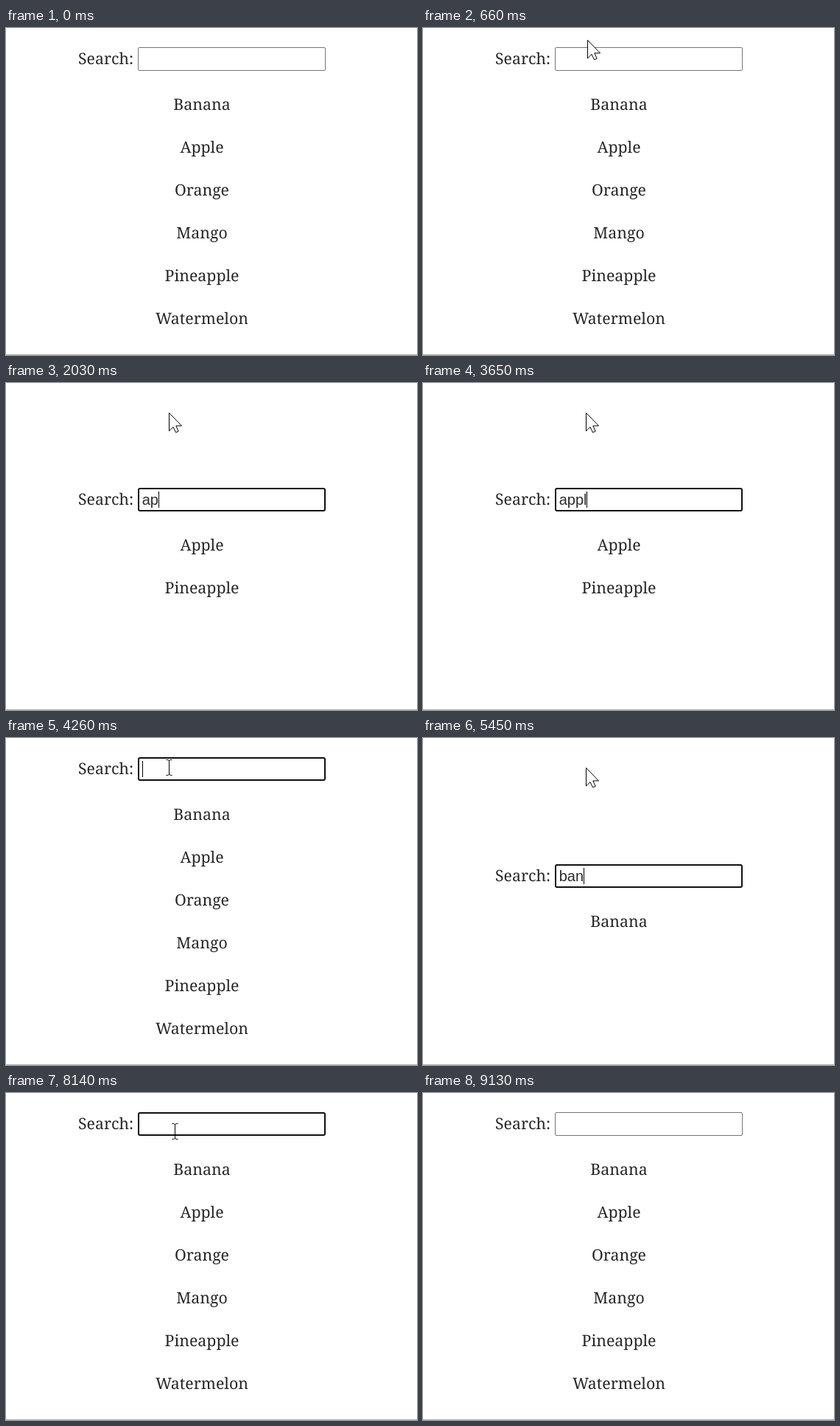
Animation of 558 by 443 pixels, one loop 9330 ms. Source, as an HTML page:

```html
<!DOCTYPE html>
<html lang="en">
<head>
<meta charset="utf-8">
<title>Search filter</title>
<style>
  html, body { margin: 0; width: 100%; height: 100%; overflow: hidden; background: #fff; }
  svg { display: block; width: 100vw; height: 100vh; }
  .serif { font: 21.3px Cambria, "Noto Serif", serif; fill: #262626; text-rendering: geometricPrecision; }
  .typed { font: 20px "Liberation Sans", Arial, sans-serif; fill: #2a2a2a; white-space: pre; }
  .item { text-anchor: middle; }
</style>
</head>
<body>
<svg viewBox="0 0 558 443">
  <rect y="442" width="558" height="1" fill="#b4b4b4"/>
  <g id="form">
    <text class="serif" x="98" y="23">Search:</text>
    <rect id="idle" x="179.5" y=".5" width="254" height="31" rx="1.5" fill="#fff" stroke="#767676"/>
    <rect id="ring" x="180" y="1" width="253" height="30" rx="2" fill="#fff" stroke="#101010" stroke-width="2"/>
    <text id="typed" class="typed" x="184.7" y="23"></text>
    <rect id="caret" y="5" width="1" height="22" fill="#000"/>
    <g id="list"></g>
  </g>
  <circle id="press" cx="221" cy="40" r="18" fill="#ff0" fill-opacity=".47"/>
  <g id="mouse">
    <path id="arrow" d="M.5 .5V25L6 19.6 9.5 27 13.2 25.4 9.8 18H17.5Z" fill="#fff" stroke="#000"/>
    <path id="beam" d="M-3.5-10.5H-1.5L.5-9.5 2.5-10.5H4.5M.5-9.5V9.5M-3.5 10.5H-1.5L.5 9.5 2.5 10.5H4.5" fill="none" stroke="#000"/>
  </g>
</svg>
<script>
const LOOP = 9330, FOCUS = 1020, BLUR = 9130, BLINK = 530;
const fruits = ["Banana", "Apple", "Orange", "Mango", "Pineapple", "Watermelon"];

// [time, value of the field]
const keys = [
  [FOCUS, ""], [1650, "a"], [2030, "ap"], [2180, "app"], [2460, "appl"], [3170, "apple"],
  [3650, "appl"], [3800, "app"], [3950, "ap"], [4110, "a"], [4260, ""],
  [4740, "b"], [5120, "ba"], [5450, "ban"], [5630, "bann"],
  [6440, "ban"], [6720, "ba"], [7000, "b"], [7200, ""], [7230, ""]
];

// [time, x, y] of the pointer tip
const path = [
  [50, 503, 430], [150, 430, 310], [250, 365, 220], [370, 305, 160], [470, 258, 60],
  [560, 236, 0], [660, 223, 16], [710, 223, 16], [850, 221, 40], [8100, 221, 40],
  [8250, 250, 85], [8400, 325, 190], [8550, 412, 310], [8700, 490, 400],
  [8800, 523, 432], [8850, 513, 438], [8900, 513, 443]
];

const $ = id => document.getElementById(id);
const show = (el, on) => el.setAttribute("visibility", on ? "visible" : "hidden");
const move = (el, x, y) => el.setAttribute("transform", `translate(${x} ${y})`);

const rows = fruits.map(name => {
  const el = document.createElementNS("http://www.w3.org/2000/svg", "text");
  el.setAttribute("class", "serif item");
  el.setAttribute("x", 266);
  el.textContent = name;
  $("list").append(el);
  return el;
});

function pointerAt(t) {
  const i = path.findIndex(p => p[0] > t);
  if (i < 1) return null;
  const [t0, x0, y0] = path[i - 1], [t1, x1, y1] = path[i];
  const k = (t - t0) / (t1 - t0);
  return [x0 + (x1 - x0) * k, y0 + (y1 - y0) * k];
}

function draw(t) {
  const [since, value] = keys.filter(k => k[0] <= t).pop() || [0, ""];
  const focused = t >= FOCUS && t < BLUR;

  const hits = fruits.map(f => f.toLowerCase().includes(value));
  const top = 26 + 29 * hits.filter(h => !h).length;
  move($("form"), 0, top);
  let n = 0;
  rows.forEach((el, i) => {
    show(el, hits[i]);
    if (hits[i]) el.setAttribute("y", 85 + 58 * n++);
  });

  show($("idle"), !focused);
  show($("ring"), focused);
  $("typed").textContent = value;
  const width = value ? $("typed").getComputedTextLength() : 0;
  $("caret").setAttribute("x", Math.floor(185 + width));
  show($("caret"), focused && Math.floor((t - since) / BLINK) % 2 === 0);

  show($("press"), t >= FOCUS && t < 1270);
  const tip = pointerAt(t);
  const over = tip && tip[0] > 179 && tip[0] < 434 && tip[1] >= top && tip[1] < top + 32;
  if (tip) move($("mouse"), Math.round(tip[0]), Math.round(tip[1]));
  show($("arrow"), tip && !over);
  show($("beam"), over);
}

const start = performance.now();
function tick() {
  draw((performance.now() - start) % LOOP);
  requestAnimationFrame(tick);
}
tick();
</script>
</body>
</html>
```
